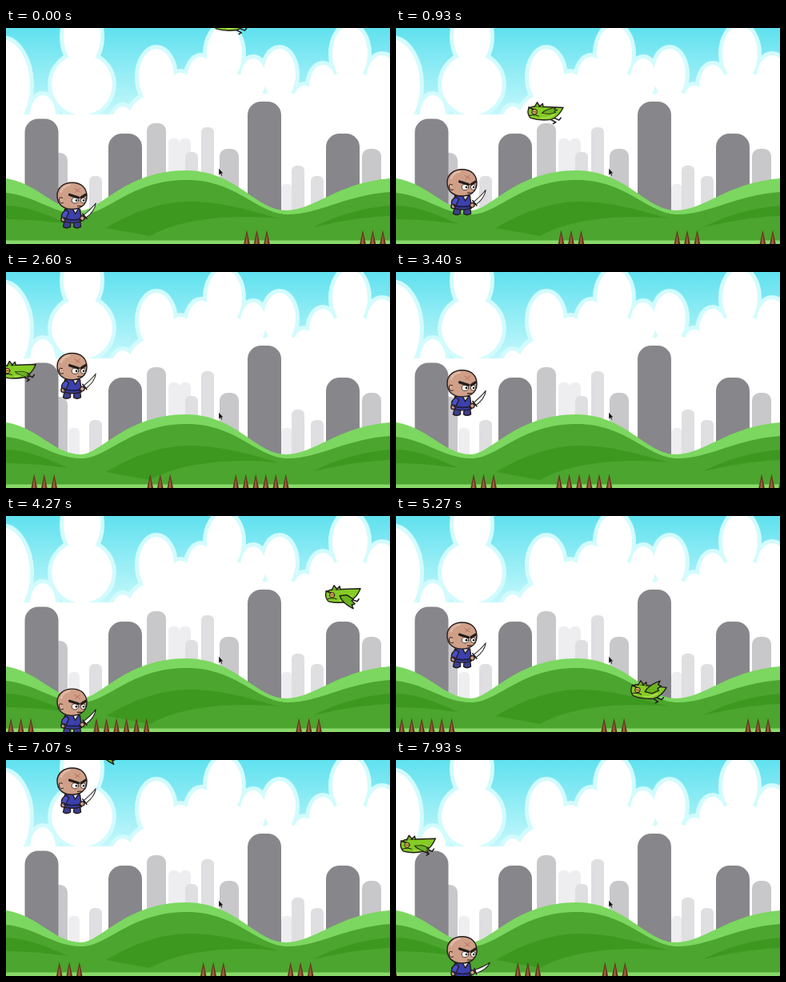
Write an HTML page that moves like this. It is 480x270 px and loops after 8000 ms.

```html
<!DOCTYPE html>
<html lang="en">
<head>
<meta charset="utf-8">
<title>Runner</title>
<style>
html, body { margin: 0; width: 100%; height: 100%; overflow: hidden; background: #fff; }
svg { display: block; width: 100vw; height: 100vh; }
.ink { stroke: #241d1c; stroke-width: 1.4; stroke-linejoin: round; stroke-linecap: round; }
</style>
</head>
<body>
<svg viewBox="0 0 480 270">
  <defs>
    <linearGradient id="sky" x2="0" y2="1">
      <stop stop-color="#60e1ef"/><stop offset="1" stop-color="#c6f8fb"/>
    </linearGradient>
    <g id="spike">
      <path d="M0 252.500L4 271H-4Z" fill="#67321f"/>
      <path d="M0 257L1.500 271H-2Z" fill="#9a6541"/>
    </g>
    <g id="clouds"></g>
    <g id="dragon">
      <g class="ink">
        <path d="M5 6l9 4l-3 2M9 4l9 3l2-3" fill="none" stroke-width="1.600"/>
        <path d="M-21-5Q-15-9-8-8L22-9Q17 3 8 7Q-6 10-18 7Q-23 2-21-5Z" fill="#85cc24"/>
        <path d="M-14-7L-11-13L-7-8M-8-8L-4-12L-3-8" fill="#70b51e"/>
        <path d="M-21-6L-15-4" stroke-width="1.800"/>
        <circle cx="-13.500" cy="-1" r="3.200" fill="#d9b256" stroke-width="1"/>
        <path d="M-19 4Q-13 2-8 4" fill="none" stroke-width="1.100"/>
      </g>
      <path d="M-14.500-1h.2M-12.500-1h.2" stroke="#432416" stroke-width="1.300" stroke-linecap="round"/>
      <path d="M-5 6Q5 6 12 0" fill="none" stroke="#b0e354" stroke-width="1.300"/>
    </g>
    <path id="wing" class="ink" d="M-4 0Q-1-9 13-16L11-11L15-10L11-6L13-4L5 1Z" fill="#69b41f"/>
    <clipPath id="stage"><path d="M0 0H480V270H0Z"/></clipPath>
  </defs>
  <g clip-path="url(#stage)">
    <path d="M0 0H480V110H0Z" fill="url(#sky)"/>
    <use href="#clouds" fill="#d2fbfd" stroke="#d2fbfd" stroke-width="10"/>
    <use href="#clouds" fill="#fff"/>
    <path d="M0 108H480V270H0Z" fill="#fff"/>
    <g id="towers"></g>

    <path d="M0 188C42 195 60 228 94 228C118 228 150 178 225 178C288 178 312 228 350 228C385 228 415 193 480 188V270H0Z" fill="#7bd75f"/>
    <path d="M0 206C38 210 60 233 94 233C128 233 155 190 226 190C289 190 314 233 353 233C390 233 425 209 480 205V270H0Z" fill="#4ba52e"/>
    <g fill="#3d981f">
      <path d="M0 222C30 223 55 235 78 245C48 241 24 239 0 239Z"/>
      <path d="M125 250C160 229 195 217 230 217C268 217 302 227 340 238C275 232 215 240 180 260Z"/>
      <path d="M384 249C412 235 444 225 480 222V235C446 236 416 242 384 249Z"/>
    </g>
    <path d="M0 265.500H480V270H0Z" fill="#88d969"/>
    <g id="spikes"></g>

    <g id="hero">
      <g class="ink">
        <path id="legA" d="M-9 47h7v9q-5 3-9 0z" fill="#3b3f92"/>
        <path id="legB" d="M3 47h7l1 9q-5 3-9 0z" fill="#3b3f92"/>
        <path d="M-9 34Q0 30 10 34L12 49Q1 53-11 49Z" fill="#3c40ad"/>
        <path d="M-7 35Q-14 38-13 45L-8 47L-4 38Z" fill="#4a50c5"/>
        <circle cx="-11" cy="47" r="2.600" fill="#cf9f87"/>
        <path d="M-10 46Q1 49 12 46" fill="none" stroke="#201f48" stroke-width="2"/>
        <path d="M1 34L4 40L8 34" fill="#e0dce3"/>
        <g id="sword">
          <path d="M-2 0H5" stroke-width="3"/>
          <path d="M5-2Q17-2 26-4Q19 3 5 2.500Z" fill="#f2f4f4" stroke-width="1"/>
          <path d="M5-4V4" stroke-width="1.600"/>
          <circle cx="1" r="2.800" fill="#cf9f87"/>
        </g>
        <path d="M0 .8C12 .8 18.500 8 18.500 18C18.500 29 10 34 0 34C-11 34-18.500 28-18.500 17C-18.500 7-10 .8 0 .8Z" fill="#cf9f87"/>
        <path d="M-12 20q-5-2-4 3q1 5 5 3" fill="#d8ab94" stroke-width="1"/>
        <ellipse cx="4" cy="23" rx="4.300" ry="3.600" fill="#f8f5f2" stroke-width=".8"/>
        <ellipse cx="14" cy="23" rx="3.200" ry="3.400" fill="#f8f5f2" stroke-width=".8"/>
        <path d="M-3 16L8 19.500M11.500 19.500L17 16" fill="none" stroke-width="3.200"/>
        <path d="M7 30H12" stroke-width="1.100"/>
      </g>
      <path d="M3 8L10 13M10 8L4 13" stroke="#b27362"/>
      <circle cx="5.500" cy="23" r="1.300"/><circle cx="14.500" cy="23" r="1.200"/>
      <path d="M-14 13Q-11 4-2 3.500" fill="none" stroke="#e3bba6" stroke-width="2.400"/>
    </g>
    <g id="dragons"></g>
    <path d="M266 175.500V184L268 182.200L269.300 185L270.600 184.400L269.400 181.700H271.800Z" fill="#111" stroke="#eee" stroke-width=".4"/>
  </g>
</svg>
<script>
const el = id => document.getElementById(id);
const LOOP = 8000, FPS = 15, GROUND = 220, GRAVITY = 0.00115;

// Each cloud is a tall puff on a wider round one: center, top, radius.
const puff = ([x, top, r]) =>
  `<ellipse cx="${x}" cy="${top + 1.6 * r}" rx="${r}" ry="${1.6 * r}"/><circle cx="${x}" cy="${top + 4.2 * r}" r="${1.65 * r}"/>`;
el("clouds").innerHTML = [
  [-6, 14, 36], [46, 84, 16], [95, -26, 23], [146, 98, 14], [188, 26, 22], [218, 56, 18], [244, 36, 18],
  [273, -3, 22], [309, 38, 16], [342, 26, 20], [373, 72, 15], [396, 46, 17], [430, -3, 22], [470, 34, 20]
].map(puff).join("");

// Rows from far to near: color, width, then center and top of each tower.
const skyline = [
  ["#eeedf0", 14, [85, 195], [210, 138], [224, 138], [351, 195]],
  ["#dfdee1", 16, [112, 185], [232, 155], [252, 124], [365, 172], [389, 185]],
  ["#c8c7ca", 24, [65, 156], [188, 119], [279, 151], [457, 151]],
  ["#87868b", 42, [44.5, 113.5], [149, 132], [323, 92], [421, 132]]
];
el("towers").innerHTML = skyline.map(([color, width, ...row]) => `<g fill="${color}">` + row.map(([x, y]) =>
  `<rect x="${x - width / 2}" y="${y}" width="${width}" height="${270 - y}" rx="${width * .4}"/>`).join("") + "</g>").join("");

const SPIKE_GAP = 12.5;
el("spikes").innerHTML = [301, 446, 553, 590.5, 806, 986, 1095, 1317].map(x =>
  [0, 1, 2].map(i => `<use href="#spike" x="${x + i * SPIKE_GAP}"/>`).join("")).join("");

const dragons = [
  { x: 281, mid: 102, swing: 107, peak: 0 },
  { x: 861, mid: 105, swing: 116, peak: 3385 }
].map(d => {
  const node = document.createElementNS("http://www.w3.org/2000/svg", "g");
  node.innerHTML = `<use href="#dragon"/><use href="#wing"/>`;
  el("dragons").append(node);
  return { ...d, node, wing: node.lastChild };
});

const wave = (t, period) => Math.cos(t / period * 2 * Math.PI);
const scrollAt = t => t * (0.1008 + 5.4e-7 * t);

// time and height of each jump's apex
const jumps = [[-577, 1], [1485, 1], [2977, 19], [4839, 27], [6947, 1]];
const heroTop = t => Math.min(GROUND, ...jumps.map(([apex, top]) => top + GRAVITY / 2 * (t - apex) ** 2));

const move = (node, x, y, turn = 0) =>
  node.setAttribute("transform", `translate(${x.toFixed(2)} ${y.toFixed(2)}) rotate(${turn.toFixed(2)})`);

function draw(t) {
  const scroll = scrollAt(t), top = heroTop(t), running = top >= GROUND - 1;
  const stride = running ? Math.sin(t / 65) : 0;
  move(el("spikes"), -scroll, 0);
  move(el("hero"), 82.5, top);
  move(el("legA"), stride * 2, 0);
  move(el("legB"), -stride * 2, 0);
  move(el("sword"), 12, 46, running ? -22 + stride * 4 : -39);

  const flap = wave(t - 5270, 400);
  for (const { node, wing, x, mid, swing, peak } of dragons) {
    wing.setAttribute("transform", `scale(1 ${flap.toFixed(2)})`);
    move(node, x - scroll, mid - swing * wave(t - peak, 3630), Math.max(0, flap) * 8);
  }
}

const start = performance.now();
function tick() {
  const t = (performance.now() - start) % LOOP;
  draw(Math.floor((t + 4) * FPS / 1000) % (LOOP * FPS / 1000) * 1000 / FPS);
  requestAnimationFrame(tick);
}
tick();
</script>
</body>
</html>
```
